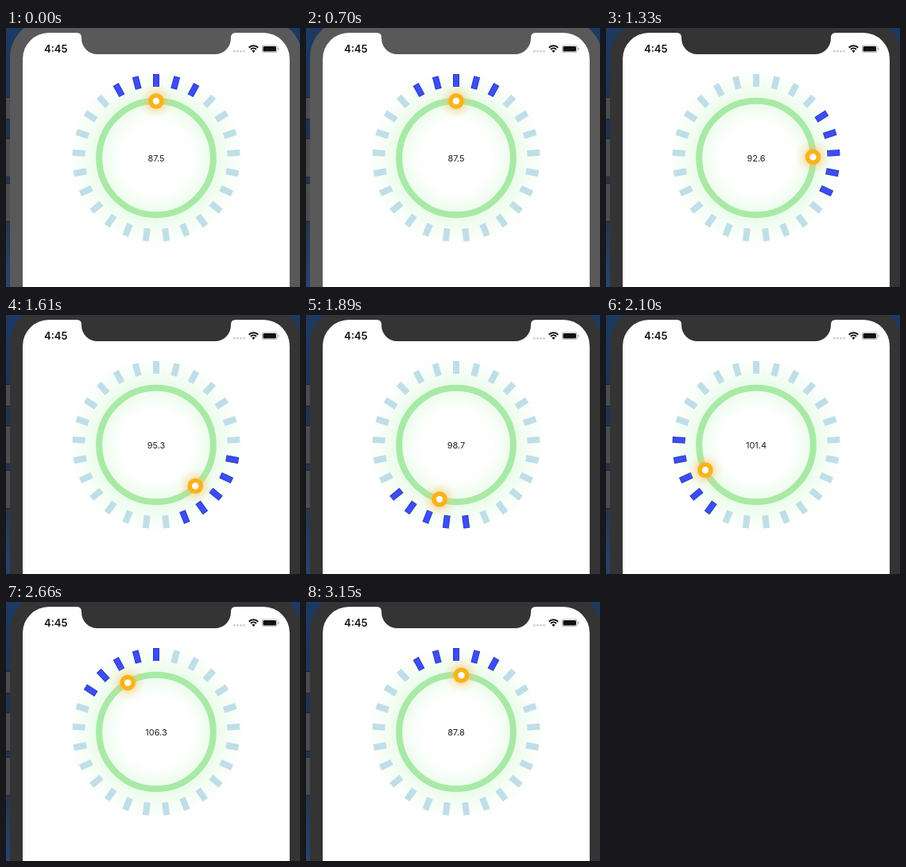
An HTML page with a canvas for the animation above (4200 ms loop, 370x326 px).

```html
<!DOCTYPE html>
<html>
<head>
<meta charset="utf-8">
<style>
html, body { margin: 0; width: 100%; height: 100%; overflow: hidden; }
canvas { display: block; }
</style>
</head>
<body>
<canvas id="stage" width="370" height="326"></canvas>
<script>
const ctx = document.getElementById('stage').getContext('2d');
const LOOP = 4200, STEP = 70, TAU = Math.PI * 2;
const CX = 189, CY = 163.5, TICKS = 25;

// Knob drag: time in ms, angle in degrees clockwise from the top
const drag = [[700, 0], [1050, 47], [1610, 136.4], [2100, 243.6],
              [2170, 250.5], [2660, 330], [2870, 365.2]];

function slope(i) {
  if (i === 0 || i === drag.length - 1) return 0;
  const [t0, a0] = drag[i - 1], [t1, a1] = drag[i + 1];
  return (a1 - a0) / (t1 - t0);
}

function angleAt(t) {
  const last = drag.length - 1;
  if (t <= drag[0][0]) return 0;
  if (t >= drag[last][0]) return drag[last][1];
  const i = drag.findIndex(k => k[0] > t) - 1;
  const [t0, a0] = drag[i], [t1, a1] = drag[i + 1];
  const h = t1 - t0, u = (t - t0) / h, v = 1 - u;
  return a0 + (a1 - a0) * u * u * (3 - 2 * u)
       + h * u * v * (v * slope(i) - u * slope(i + 1));
}

function box(x, y, w, h, r, color) {
  ctx.fillStyle = color;
  ctx.beginPath();
  ctx.roundRect(x, y, w, h, r);
  ctx.fill();
}

function disc(x, y, r, color) {
  ctx.fillStyle = color;
  ctx.beginPath();
  ctx.arc(x, y, r, 0, TAU);
  ctx.fill();
}

function ring(x, y, r, width, color, from = 0, to = TAU) {
  ctx.strokeStyle = color;
  ctx.lineWidth = width;
  ctx.beginPath();
  ctx.arc(x, y, r, from, to);
  ctx.stroke();
}

function glow(x, y, r0, r1, stops) {
  const g = ctx.createRadialGradient(x, y, r0, x, y, r1);
  stops.forEach(([at, color]) => g.addColorStop(at, color));
  disc(x, y, r1, g);
}

function label(text, x, y, font, color, align) {
  ctx.font = font + ' Inter, sans-serif';
  ctx.fillStyle = color;
  ctx.textAlign = align;
  ctx.fillText(text, x, y);
}

function phone(bezel) {
  const sky = ctx.createLinearGradient(0, 0, 0, 326);
  sky.addColorStop(0, '#1c3a62');
  sky.addColorStop(0.4, '#1e3352');
  sky.addColorStop(0.75, '#27364e');
  sky.addColorStop(1, '#25456f');
  ctx.fillStyle = sky;
  ctx.fillRect(0, 0, 370, 326);

  for (const [y, h] of [[87, 28], [139, 49], [195, 49]]) {
    box(-4, y, 12, h, 1, '#222426');
    box(-4, y + 1, 11, h - 2, 1, '#4c4d50');
  }
  box(5, -10, 368, 400, 47, bezel);
  box(21, 6, 336, 400, 33, '#fff');

  // Notch with flared shoulders
  ctx.fillStyle = bezel;
  ctx.beginPath();
  ctx.moveTo(89, 5);
  ctx.lineTo(89, 6);
  ctx.quadraticCurveTo(95, 6, 95, 12);
  ctx.arcTo(95, 33, 114, 33, 20);
  ctx.arcTo(283, 33, 283, 12, 20);
  ctx.lineTo(283, 12);
  ctx.quadraticCurveTo(283, 6, 289, 6);
  ctx.lineTo(289, 5);
  ctx.fill();
}

function statusBar() {
  label('4:45', 48, 31, '600 13px', '#111', 'left');
  for (let i = 0; i < 4; i++) disc(287.5 + i * 4, 29.3, 1.4, '#ccc');

  const mid = -Math.PI / 2;
  ring(311.5, 30.5, 8.2, 2, '#111', mid - 0.78, mid + 0.78);
  ring(311.5, 30.5, 5, 2, '#111', mid - 0.78, mid + 0.78);
  ctx.fillStyle = '#111';
  ctx.beginPath();
  ctx.moveTo(311.5, 31);
  ctx.arc(311.5, 31, 3, mid - 0.78, mid + 0.78);
  ctx.fill();

  box(322, 21.5, 19.5, 9.5, 2.8, '#aaa');
  box(322.8, 22.3, 17.9, 7.9, 2.2, '#fff');
  box(323.5, 23, 16.5, 6.5, 1.6, '#111');
  box(342.2, 24.7, 1.3, 3.2, 0.6, '#aaa');
}

function dial(angle) {
  glow(CX, CY, 44, 112, [
    [0, 'rgba(225,250,225,0)'], [0.22, 'rgba(225,250,225,.35)'],
    [0.42, 'rgba(215,248,215,.6)'], [0.65, 'rgba(225,250,225,.4)'],
    [1, 'rgba(225,250,225,0)']]);

  const center = Math.round(angle / 360 * TICKS);
  for (let i = 0; i < TICKS; i++) {
    const away = (i - center + 2 * TICKS) % TICKS;
    const lit = Math.min(away, TICKS - away) <= 2;
    ctx.save();
    ctx.translate(CX, CY);
    ctx.rotate(i / TICKS * TAU);
    ctx.fillStyle = lit ? '#2a37b4' : '#c0dee8';
    ctx.fillRect(-4, -105.5, 8, 16);
    if (lit) {
      ctx.fillStyle = '#3c4df6';
      ctx.fillRect(-3.2, -104.7, 6.4, 14.4);
    }
    ctx.restore();
  }

  ring(CX, CY, 71.8, 8, '#a9e9a6');

  const a = angle / 360 * TAU;
  const x = CX + 71.5 * Math.sin(a), y = CY - 71.5 * Math.cos(a);
  glow(x, y, 7, 22, [[0, 'rgba(255,175,50,.5)'], [0.45, 'rgba(255,190,90,.22)'],
                     [1, 'rgba(255,200,120,0)']]);
  disc(x, y, 8, '#fff');
  ring(x, y, 7, 5.6, '#fab31c');

  const value = 87.5 + angle % 360 / 360 * 20.5;
  label(value.toFixed(1), CX, 167.5, '11px', '#222', 'center');
}

function draw(now) {
  const t = Math.floor(now % LOOP / STEP) * STEP;
  phone(t < 770 ? '#595959' : '#343434');
  statusBar();
  dial(angleAt(t));
  requestAnimationFrame(draw);
}
requestAnimationFrame(draw);
</script>
</body>
</html>
```
